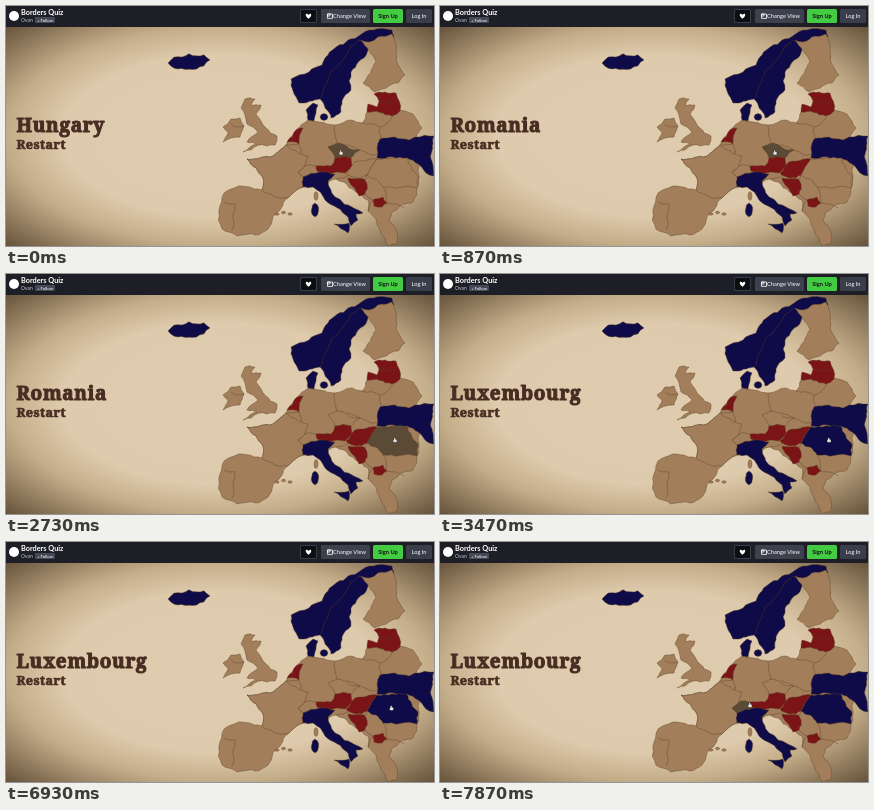
An HTML page with a canvas for the animation above (8 s loop, 428x240 px).

```html
<!DOCTYPE html>
<html lang="en">
<head>
<meta charset="utf-8">
<title>Borders Quiz</title>
<style>
html, body { margin: 0; width: 100%; height: 100%; overflow: hidden; background: #1e1f26; }
canvas { display: block; width: 100%; height: 100%; }
</style>
</head>
<body>
<canvas id="stage"></canvas>
<script>
const W = 428, H = 240, LOOP = 8000;
const canvas = document.getElementById('stage');
const ctx = canvas.getContext('2d');
const TAN = [162, 126, 91], NAVY = [15, 11, 72], RED = [123, 20, 22], DARK = [91, 74, 53];
const INK = '#482d22', SANS = 'Lato, sans-serif';
const shapes = [];

const clamp = v => Math.max(0, Math.min(1, v));
const mix = (a, b, p) => a + (b - a) * p;
const parse = str => str.split(' ').map(p => p.split(',').map(Number));

// Splits an edge into a jagged line; the same edge always gets the same shape.
function rough(a, b) {
  const dx = b[0] - a[0], dy = b[1] - a[1];
  if (Math.hypot(dx, dy) < 5) return [b];
  const side = dx > 0 || (dx === 0 && dy > 0) ? 1 : -1;
  const wave = Math.sin((a[0] + b[0]) * 12.99 + (a[1] + b[1]) * 78.23) * 43758.5;
  const bend = (wave - Math.floor(wave) - 0.5) * 0.24 * side;
  const mid = [(a[0] + b[0]) / 2 - dy * bend, (a[1] + b[1]) / 2 + dx * bend];
  return [...rough(a, mid), ...rough(mid, b)];
}

function trace(points, closed) {
  const path = new Path2D();
  path.moveTo(...points[0]);
  for (let i = 1; i < points.length + closed; i++) {
    for (const p of rough(points[i - 1], points[i % points.length])) path.lineTo(...p);
  }
  if (closed) path.closePath();
  return path;
}

function land(color, outline, name) {
  shapes.push({ color, name, path: trace(parse(outline), 1) });
}

function island(color, x, y, rx, ry, tilt = 0) {
  const points = Array.from({ length: 8 }, (_, i) => {
    const a = i * Math.PI / 4;
    return [x + rx * Math.cos(a), y + ry * Math.sin(a + tilt)];
  });
  shapes.push({ color, path: trace(points, 1) });
}

function border(line) {
  shapes.push({ path: trace(parse(line), 0) });
}

island(NAVY, 183, 55.5, 21, 8, -0.2);
land(TAN, '225,113 234,112 238,120 234,131 217,136 222,126 217,121');
border('225,118 231,121 238,120');
land(TAN, '239,93 249,93 245,99 255,99 250,108 260,122 271,130 269,139 237,146 251,138 241,136 252,126 241,118 235,102');
land(NAVY, '285,73 303,66 316,59 322,49 342,34 367,24 386,24 388,31 372,31 363,36 361,47 345,66 345,84 336,95 335,106 325,112 314,93 293,97');
border('314,93 325,65 345,40 353,34 361,40');
land(TAN, '355,34 363,36 372,31 386,28 390,47 399,69 392,77 369,86 357,77 370,56');

// The mainland, with borders where neighbours share a colour
land(TAN, '302,114 328,119 346,114 356,117 361,106 394,104 407,108 416,122 410,131 413,161 411,182 407,196 386,206 383,214 391,226 390,238 383,240 374,224 362,205 362,194 338,176 330,173 297,181 282,192 267,211 262,223 250,229 231,230 216,223 218,187 225,183 256,184 257,172 241,153 263,151 280,139 290,124');
border('218,196 229,198 226,224');
border('328,119 331,137');
border('356,117 374,121 375,132 371,152');
border('374,121 387,109 394,104');
border('341,138 354,144 373,148');
border('280,139 293,138 295,149 299,160');
border('344,168 330,173');
border('361,169 358,176 359,188 367,194 362,205');
border('377,181 381,197 398,202');
land(TAN, '241,153 263,151 280,139 302,150 299,160 292,166 298,171 297,181 282,192 256,184 257,172', 'france');

land(NAVY, '302,114 300,104 307,97 312,99 308,115');
island(NAVY, 318, 111, 4, 3.5);
land(RED, '368,88 390,87 394,105 386,110 361,106 362,98 371,101 373,95');
border('373,95 391,96');
land(RED, '281,136 290,124 297,122 293,138');
land(TAN, '322,141 333,137 354,144 345,152 329,152', 'czechia');
land(TAN, '292,166 299,160 310,160 314,166 297,171', 'switzerland');
land(RED, '310,160 325,160 329,152 345,152 346,160 339,167 311,165');
land(TAN, '345,161 349,156 371,153 361,169 350,172 340,167', 'hungary');
land(NAVY, '371,152 374,133 403,134 409,131 428,130 428,170 420,167 412,158 401,152');
land(TAN, '371,153 401,152 412,170 411,182 377,181 361,169', 'romania');
land(RED, '342,172 358,173 361,178 359,188 353,190');
land(RED, '367,194 377,191 381,197 376,201 368,200');

// Around the Mediterranean
land(NAVY, '297,171 314,166 329,168 322,175 325,184 357,207 350,208 352,214 345,220 342,211 319,194 307,181 297,181');
land(NAVY, '328,218 343,217 342,227');
island(NAVY, 309, 204, 3.6, 7);
island(TAN, 310, 190, 2, 4.5);
for (let i = 0; i < 3; i++) island(TAN, 271 + i * 6.5, 208 - (i % 2) * 1.5, 2.2, 1.3);

const fades = [
  ['hungary', 400, 870, TAN, RED],
  ['czechia', 2400, 2730, DARK, TAN],
  ['romania', 2460, 2730, TAN, DARK],
  ['romania', 3000, 3470, DARK, NAVY],
  ['france', 6970, 7200, TAN, DARK],
  ['france', 7530, 7870, DARK, TAN],
  ['switzerland', 7570, 7870, TAN, DARK]
];

// start, end, x, y: the pointer rests between moves
const moves = [
  [1600, 1800, 336, 147.5],
  [2400, 2620, 389, 166],
  [4870, 4930, 388, 165.5],
  [5470, 5470, 387.5, 165.5],
  [6870, 6930, 385.5, 166],
  [6940, 7130, 290, 153],
  [7530, 7730, 310, 163]
];

function colorAt({ name, color }, t) {
  const list = fades.filter(f => f[0] === name);
  if (!list.length) return color;
  const [, from, to, a, b] = list.filter(f => f[1] <= t).pop() || list[0];
  const p = clamp((t - from) / (to - from));
  return a.map((v, i) => Math.round(mix(v, b[i], p)));
}

function pointerAt(t) {
  let x = 335, y = 146.5;
  for (const [from, to, nx, ny] of moves) {
    if (t < from) break;
    const p = clamp((t - from) / (to - from || 1));
    x = mix(x, nx, p);
    y = mix(y, ny, p);
  }
  return [x, y];
}

function text(str, x, y, font, color, align = 'left') {
  ctx.font = font;
  ctx.fillStyle = color;
  ctx.textAlign = align;
  ctx.fillText(str, x, y);
}

function slab(str, y, size) {
  ctx.letterSpacing = size * 0.035 + 'px';
  text(str, 10.5, y, `900 ${size}px "Noto Serif", serif`, INK);
  ctx.strokeStyle = INK;
  ctx.lineWidth = size * 0.055;
  ctx.strokeText(str, 10.5, y);
  ctx.letterSpacing = '0px';
}

function box(x, y, w, h, r, color) {
  ctx.fillStyle = color;
  ctx.beginPath();
  ctx.roundRect(x, y, w, h, r);
  ctx.fill();
}

function button(label, x, w, color, ink = '#fff', weight = 400, shift = 0) {
  box(x, 3, w, 14, 1.5, color);
  text(label, x + w / 2 + shift, 12.2, `${weight} 5.7px ${SANS}`, ink, 'center');
}

function paper() {
  ctx.save();
  ctx.translate(W / 2, 130);
  ctx.scale(1, 0.514);
  const g = ctx.createRadialGradient(0, 0, 0, 0, 0, 303);
  g.addColorStop(0, '#dfcbad');
  g.addColorStop(0.52, '#decaac');
  g.addColorStop(0.7, '#c4ad89');
  g.addColorStop(1, '#66523a');
  ctx.fillStyle = g;
  ctx.fillRect(-W / 2, -260, W, 520);
  ctx.restore();
}

function heart(x, y) {
  ctx.fillStyle = '#fff';
  ctx.beginPath();
  ctx.moveTo(x, y + 2.6);
  ctx.bezierCurveTo(x - 5, y - 1, x - 2, y - 4, x, y - 1.3);
  ctx.bezierCurveTo(x + 2, y - 4, x + 5, y - 1, x, y + 2.6);
  ctx.fill();
}

function header() {
  box(0, 0, W, 21, 0, '#1e1f26');
  ctx.fillStyle = '#fff';
  ctx.beginPath();
  ctx.arc(8, 10, 5, 0, Math.PI * 2);
  ctx.fill();
  text('Borders Quiz', 15, 9, `700 7.3px ${SANS}`, '#fff');
  text('Ovan', 15, 16, `400 5px ${SANS}`, '#c0c3d0');
  box(29, 11, 20, 6, 1, '#444857');
  text('+ Follow', 39, 15.6, `400 4.3px ${SANS}`, '#fff', 'center');

  box(294, 3, 17, 14, 1.5, '#3a3d49');
  box(295, 4, 15, 12, 1, '#0d0e12');
  heart(302.5, 10.2);
  button('Change View', 315, 49, '#3d414e', '#fff', 400, 4);
  ctx.strokeStyle = '#fff';
  ctx.lineWidth = 0.8;
  ctx.strokeRect(321.5, 8, 5, 4.4);
  ctx.strokeRect(321.5, 8, 2.5, 2);
  button('Sign Up', 367, 30, '#43cb43', '#111', 700);
  button('Log In', 400, 26, '#3a3e4b');
}

function hand(x, y) {
  const shape = new Path2D();
  shape.roundRect(x - 0.9, y - 2.2, 1.2, 3, 0.6);
  shape.roundRect(x - 1.7, y - 0.5, 3.5, 2.7, 0.8);
  ctx.strokeStyle = '#2a2a2a';
  ctx.lineWidth = 0.8;
  ctx.stroke(shape);
  ctx.fillStyle = '#e4e4e4';
  ctx.fill(shape);
}

function draw(t) {
  paper();
  ctx.lineJoin = 'round';
  for (const s of shapes) {
    if (s.color) {
      ctx.fillStyle = `rgb(${colorAt(s, t)})`;
      ctx.fill(s.path);
    }
    ctx.strokeStyle = 'rgba(92, 66, 38, 0.7)';
    ctx.lineWidth = 0.6;
    ctx.stroke(s.path);
  }
  slab(t < 400 ? 'Hungary' : t < 3000 ? 'Romania' : 'Luxembourg', 126, 19);
  slab('Restart', 143, 12.6);
  header();
  hand(...pointerAt(t));
}

function resize() {
  const d = window.devicePixelRatio || 1;
  canvas.width = Math.round(innerWidth * d);
  canvas.height = Math.round(innerHeight * d);
}

const start = performance.now();
function tick() {
  ctx.setTransform(canvas.width / W, 0, 0, canvas.height / H, 0, 0);
  draw((performance.now() - start) % LOOP);
  requestAnimationFrame(tick);
}

addEventListener('resize', resize);
resize();
tick();
</script>
</body>
</html>
```
